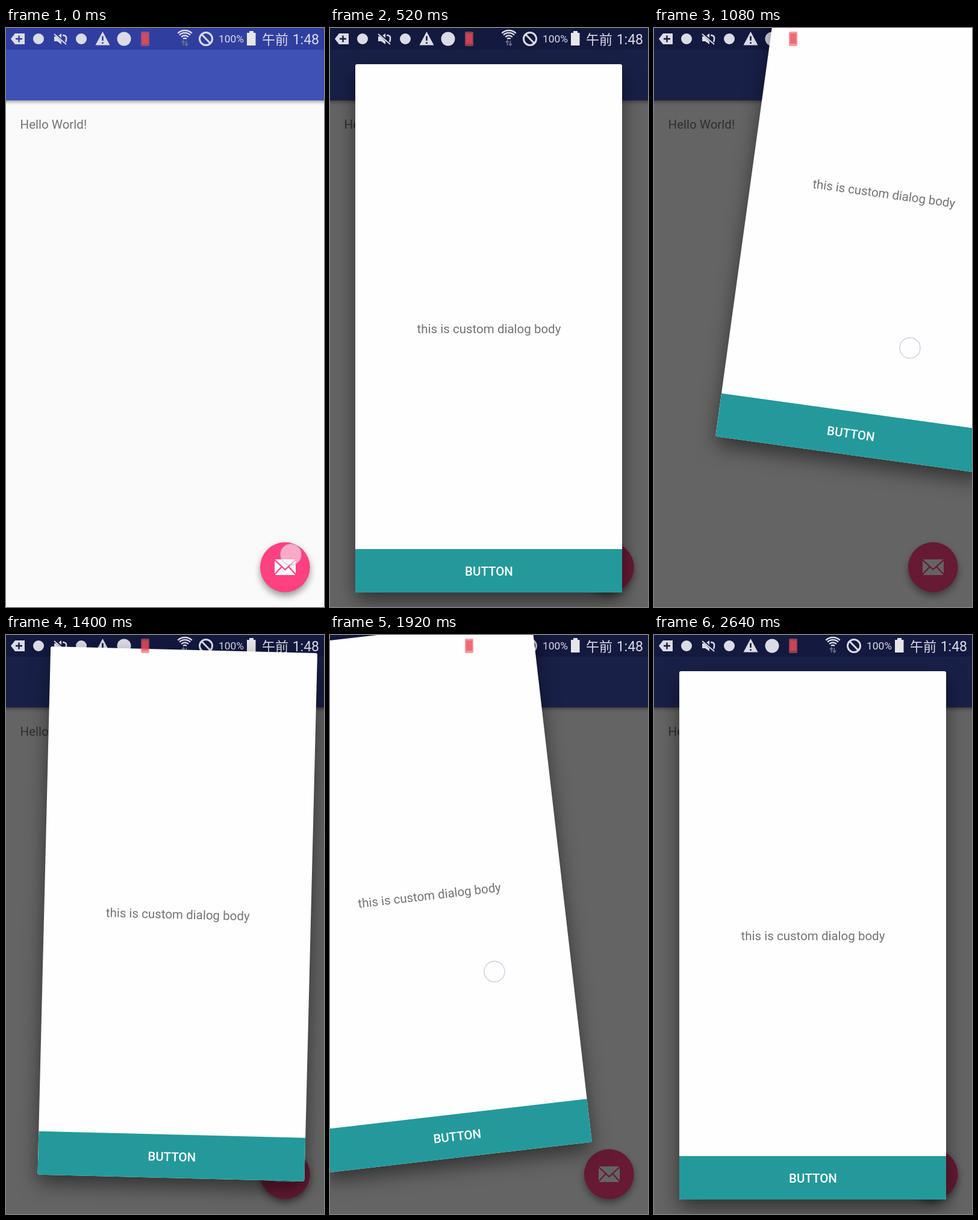
Write an HTML page with a canvas that moves like this. It is 528 px wide and 960 px high and loops after 2.68 s.

```html
<!DOCTYPE html>
<html lang="en">
<head>
<meta charset="utf-8">
<title>Swipeable dialog</title>
<style>
  html, body { margin: 0; width: 100%; height: 100%; overflow: hidden; background: #fafafa; }
  canvas { display: block; width: 528px; height: 960px; }
</style>
</head>
<body>
<canvas id="stage" width="528" height="960"></canvas>
<script>
const ctx = document.getElementById('stage').getContext('2d');
const LOOP = 2680;
const OPEN = 200;
const RETURN = 200;
const CENTER = [263.5, 498];
const ICON = '#dcdce6';
const FAB = '#ff4081';
const TEXT = '#737373';
const STATUS = [48, 63, 159];

// Finger drags the card, slows down, lets go, and the card glides home.
const SWIPES = [
  { start: 880, mid: 1080, release: 1254, via: [118, -224.5], end: [130, -218], finger: [307, 755] },
  { start: 1560, mid: 1920, release: 2067, via: [-99, -67], end: [-99, -68], finger: [372, 625] }
];

const progress = (t, a, b) => Math.min(1, Math.max(0, (t - a) / (b - a)));
const smooth = p => (1 - Math.cos(Math.PI * p)) / 2;
const lerp = (a, b, p) => a.map((v, i) => v + (b[i] - v) * p);

function swipeOffset(s, t) {
  if (t < s.mid) return lerp([0, 0], s.via, smooth(progress(t, s.start, s.mid)));
  if (t < s.release) return lerp(s.via, s.end, smooth(progress(t, s.mid, s.release)));
  return lerp(s.end, [0, 0], smooth(progress(t, s.release, s.release + RETURN)));
}

function rect(x, y, w, h, color) {
  ctx.fillStyle = color;
  ctx.fillRect(x, y, w, h);
}

function disc(x, y, r, color) {
  ctx.fillStyle = color;
  ctx.beginPath();
  ctx.arc(x, y, r, 0, 7);
  ctx.fill();
}

function fillPath(d, color) {
  ctx.fillStyle = color;
  ctx.fill(new Path2D(d));
}

function strokePath(d, color, width) {
  ctx.strokeStyle = color;
  ctx.lineWidth = width;
  ctx.stroke(new Path2D(d));
}

function text(str, x, y, size, color, { align = 'left', weight = 400, family = 'Roboto' } = {}) {
  ctx.font = `${weight} ${size}px ${family}, sans-serif`;
  ctx.textAlign = align;
  ctx.fillStyle = color;
  ctx.fillText(str, x, y);
}

function shadow(color, blur, dy) {
  ctx.shadowColor = color;
  ctx.shadowBlur = blur;
  ctx.shadowOffsetY = dy;
}

function drawPage(dim) {
  rect(0, 0, 528, 960, '#fafafa');
  ctx.save();
  shadow('rgba(0,0,0,.45)', 6, 2);
  rect(-10, 36, 548, 84, '#3f51b5');
  ctx.restore();
  rect(0, 0, 528, 36, `rgb(${STATUS})`);
  text('Hello World!', 23.5, 166.5, 20.53, TEXT);

  ctx.save();
  shadow('rgba(0,0,0,.4)', 12, 6);
  disc(463.3, 894, 41.4, FAB);
  ctx.restore();
  fillPath('M448 881H479Q481 881 481 883V905Q481 907 479 907H448Q446 907 446 905V883Q446 881 448 881Z', '#fafafa');
  strokePath('M446 882L463.5 898L481 882M446 906L458 893M481 906L469 893', FAB, 2.2);

  rect(0, 0, 528, 960, `rgba(0,0,0,${dim})`);
}

function drawStatusIcons(back) {
  fillPath('M8 18L15 9H31V27H15Z', ICON);
  strokePath('M21.5 12.5V23.5M16 18H27', back, 2.4);
  disc(54, 18, 9, ICON);
  fillPath('M80 14H85L92 9V27L85 22H80Z', ICON);
  strokePath('M94 12Q101 12 100 18Q100 24 96 25', ICON, 2.5);
  strokePath('M81 9L100 27', back, 4);
  strokePath('M80 10L100 27', ICON, 2);
  disc(125, 18, 9, ICON);
  fillPath('M160.5 6L172.5 28.5H148.5Z', ICON);
  strokePath('M160.5 13.5V21M160.5 23.5V26', back, 2.6);
  disc(196, 18, 11.5, ICON);

  for (const r of [4, 8.5, 13, 17]) {
    ctx.strokeStyle = ICON;
    ctx.lineWidth = 2.4;
    ctx.beginPath();
    ctx.arc(297, 21, r, -2.33, -0.81);
    ctx.stroke();
  }
  strokePath('M294.5 29V21M292 24L294.5 21L297 24M299.5 21V29M297 26L299.5 29L302 26', '#6f7490', 1.6);
  strokePath('M342.5 18A10.5 10.5 0 1 1 321.5 18A10.5 10.5 0 1 1 342.5 18M324.7 10.5L339.3 25.5', ICON, 3);
  text('100%', 353, 24, 17.4, ICON);
  fillPath('M400 8H404V5H411V8H414.5V29H400Z', '#e6e6e6');
  text('午前', 425, 26.5, 22, ICON, { family: '"Noto Sans CJK JP", "Noto Sans CJK"', weight: 300 });
  text('1:48', 520, 26.5, 23, ICON, { align: 'right' });
}

function drawPhoneIcon() {
  ctx.fillStyle = 'rgba(240,85,95,.6)';
  ctx.beginPath();
  ctx.roundRect(224, 6, 14, 24, 2);
  ctx.fill();
  rect(226, 9, 10, 17, 'rgba(235,75,85,.6)');
}

function drawDialog(t, [dx, dy]) {
  const scale = 1 - 0.1 * (1 - progress(t, OPEN, OPEN + 220)) ** 5;
  ctx.save();
  ctx.globalAlpha = 1 - (1 - progress(t, OPEN, OPEN + 150)) ** 3;
  ctx.translate(CENTER[0] + dx, CENTER[1] + dy);
  ctx.rotate(dx / 15 * Math.PI / 180);
  ctx.scale(scale, scale);
  ctx.translate(-CENTER[0], -CENTER[1]);

  ctx.beginPath();
  ctx.roundRect(42, 60, 443, 876, 3);
  ctx.save();
  shadow('rgba(0,0,0,.5)', 32, 14);
  ctx.fillStyle = '#fefefe';
  ctx.fill();
  ctx.restore();
  ctx.clip();
  rect(42, 864, 444, 73, '#24999b');
  text('this is custom dialog body', 264, 506, 20.53, TEXT, { align: 'center' });
  text('BUTTON', 264, 908, 20.53, '#fff', { align: 'center', weight: 500 });
  ctx.restore();
}

function drawTouch(x, y) {
  disc(x, y, 17, 'rgba(255,255,255,.55)');
  ctx.strokeStyle = 'rgba(190,190,225,.6)';
  ctx.lineWidth = 1.8;
  ctx.stroke();
}

function draw(t) {
  const dim = 0.6 * progress(t, OPEN, OPEN + 200);
  const swipe = SWIPES.find(s => t >= s.start && t < s.release + RETURN);
  const offset = swipe ? swipeOffset(swipe, t) : [0, 0];

  drawPage(dim);
  drawStatusIcons(`rgb(${lerp(STATUS, [0, 0, 0], dim)})`);
  if (t >= OPEN) drawDialog(t, offset);
  drawPhoneIcon();

  if (t < 120) drawTouch(473, 873);
  else if (swipe && t < swipe.release) drawTouch(swipe.finger[0] + offset[0], swipe.finger[1] + offset[1]);
}

const began = performance.now();
function tick() {
  draw((performance.now() - began) % LOOP);
  requestAnimationFrame(tick);
}
tick();
</script>
</body>
</html>
```
